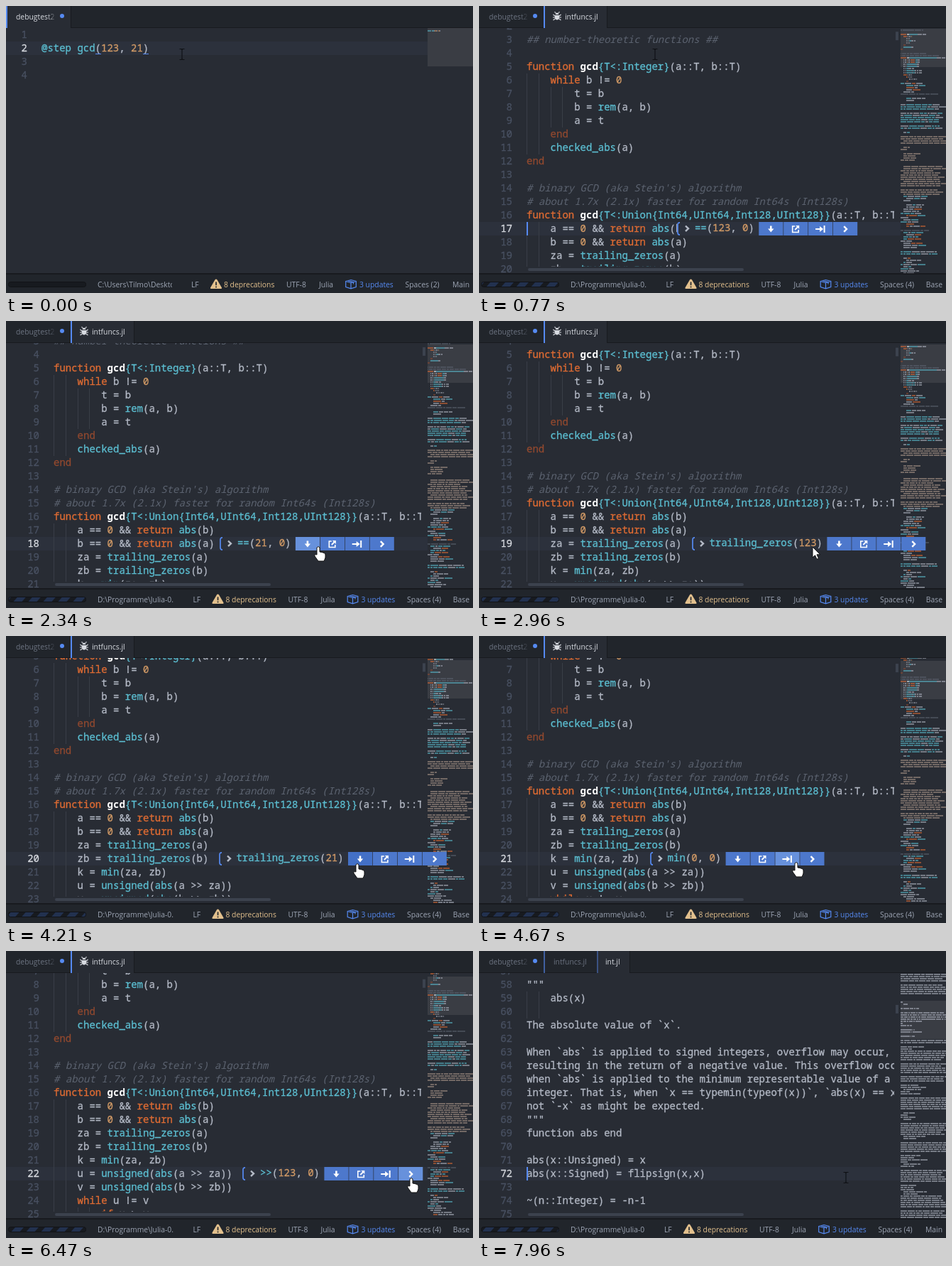
Recreate the animation shown at these times as an HTML page with a canvas. Size 658x404 px, loop 8 s.

```html
<!DOCTYPE html>
<html lang="en">
<head>
<meta charset="utf-8">
<title>Stepping through gcd</title>
<style>
  html, body { margin: 0; width: 658px; height: 404px; overflow: hidden; background: #282c34; }
  canvas { display: block; }
</style>
</head>
<body>
<canvas id="stage" width="658" height="404"></canvas>
<script>
const ctx = document.getElementById('stage').getContext('2d');
const LOOP = 8000, OPEN = 700, FINISH = 7560, JUMP = 7900;
const CHAR = 8.4, ROW = 19, TOP = 31, BOTTOM = 376, FOCUS = 304;
const MONO = '14px "Noto Sans Mono", monospace';
const UI = '10.35px "Open Sans", sans-serif';
const C = {
  bg: '#282c34', row: '#2c313c', bar: '#21252b', edge: '#181a1f', fg: '#b4bac6', bright: '#d7dae0',
  dim: '#6b7280', gutter: '#495162', blue: '#568af2', cyan: '#5cbfd2', orange: '#e06c33',
  end: '#91492f', number: '#d19a66', comment: '#5c6370', button: '#4d78cc', hover: '#6791dc',
  press: '#4370c6', warn: '#e2c08d', doc: '#b09a8c', status: '#9da5b4'
};

const scratch = ['', '@step gcd(123, 21)', '', ''];
const gcdCode = `# This file is a part of Julia. License is MIT

## number-theoretic functions ##

function gcd{T<:Integer}(a::T, b::T)
    while b != 0
        t = b
        b = rem(a, b)
        a = t
    end
    checked_abs(a)
end

# binary GCD (aka Stein's) algorithm
# about 1.7x (2.1x) faster for random Int64s (Int128s)
function gcd{T<:Union{Int64,UInt64,Int128,UInt128}}(a::T, b::T)
    a == 0 && return abs(b)
    b == 0 && return abs(a)
    za = trailing_zeros(a)
    zb = trailing_zeros(b)
    k = min(za, zb)
    u = unsigned(abs(a >> za))
    v = unsigned(abs(b >> zb))
    while u != v
        if u > v
            u, v = v, u
        end`.split('\n');
const absCode = [
  '"""', '    abs(x)', '', 'The absolute value of `x`.', '',
  'When `abs` is applied to signed integers, overflow may occur,',
  'resulting in the return of a negative value. This overflow occurs',
  'when `abs` is applied to the minimum representable value of a signed',
  'integer. That is, when `x == typemin(typeof(x))`, `abs(x) == x < 0`,',
  'not `-x` as might be expected.', '"""', 'function abs end', '',
  'abs(x::Unsigned) = x', 'abs(x::Signed) = flipsign(x,x)', '', '~(n::Integer) = -n-1', ''
];
const ABS_START = 58;

// [time, line, call shown beside the line]
const steps = [
  [OPEN, 17, '==(123, 0)'], [2050, 18, '==(21, 0)'], [2600, 19, 'trailing_zeros(123)'],
  [3560, 20, 'trailing_zeros(21)'], [4300, 21, 'min(0, 0)'], [5050, 22, '>>(123, 0)']
];
// [time, x, y]
const mousePath = [
  [0, 248, 68], [880, 248, 68], [1150, 290, 108], [1450, 459, 320], [1750, 440, 318],
  [2720, 440, 318], [2960, 470, 318], [3250, 502, 320], [3600, 495, 321], [4330, 495, 321],
  [4600, 462, 319], [4880, 366, 318], [5080, 366, 318], [5230, 407, 357], [5600, 412, 356],
  [6300, 571, 320], [7570, 571, 320], [7790, 517, 319], [LOOP, 517, 319]
];

const SYNTAX = /(?<comment>#.*)|(?<name>(?<=function )\w+)|(?<orange>\b(?:function|while|return|if)\b)|(?<end>\bend\b)|(?<cyan>\{.*\}|@\w+|[a-z]\w*(?=\()|^(?:==|>>))|(?<number>\b\d+\b)/g;

function tokenize(line, plain) {
  if (plain) return [{ at: 0, text: line, kind: 'fg' }];
  const out = [];
  let at = 0;
  const add = (text, kind) => { if (text) out.push({ at, text, kind }); at += text.length; };
  for (const m of line.matchAll(SYNTAX)) {
    add(line.slice(at, m.index), 'fg');
    add(m[0], Object.keys(m.groups).find(k => m.groups[k] !== undefined));
  }
  add(line.slice(at), 'fg');
  return out;
}

function text(str, x, y, color, font = UI, align = 'left') {
  ctx.font = font;
  ctx.textAlign = align;
  ctx.fillStyle = color;
  ctx.fillText(str, x, y);
}
// Code is set slightly heavier than the regular weight.
function codeText(str, x, y, color, style = '', align) {
  text(str, x, y, color, style + MONO, align);
  if (style) return;
  ctx.strokeStyle = color;
  ctx.lineWidth = 0.3;
  ctx.strokeText(str, x, y);
}
function rect(x, y, w, h, color) {
  ctx.fillStyle = color;
  ctx.fillRect(x, y, w, h);
}
function stroke(path, color, width = 1) {
  ctx.strokeStyle = color;
  ctx.lineWidth = width;
  ctx.stroke(new Path2D(path));
}
function fill(path, color) {
  ctx.fillStyle = color;
  ctx.fill(new Path2D(path));
}
function at(x, y, draw) {
  ctx.save();
  ctx.translate(x, y);
  draw();
  ctx.restore();
}
function clipped(x, y, w, h, draw) {
  ctx.save();
  ctx.beginPath();
  ctx.rect(x, y, w, h);
  ctx.clip();
  draw();
  ctx.restore();
}

function codeLine(line, x, y, plain) {
  for (const { at, text: str, kind } of tokenize(line, plain)) {
    const style = kind === 'name' ? 'bold ' : kind === 'comment' ? 'italic ' : '';
    codeText(str, x + at * CHAR, y, kind === 'name' ? '#ffffff' : C[kind], style);
  }
}

// Minimap rows are lists of [x, width, color].
let seed = 7;
const rand = () => (seed = (seed * 16807) % 2147483647) / 2147483647;
const pick = list => list[Math.floor(rand() * list.length)];
// kind: [indents, least width, spread, colors]
const kinds = {
  gap: [[0], 0, 0, [C.fg]],
  code: [[0, 4, 4, 8, 8], 6, 20, [C.cyan, C.fg, C.fg, C.orange]],
  wide: [[0], 46, 10, [C.cyan, C.cyan, C.fg]],
  note: [[0], 35, 25, [C.comment]],
  doc: [[0, 0, 4], 46, 18, [C.doc]],
  stub: [[0, 4], 6, 14, [C.doc]],
  plain: [[0], 56, 10, [C.fg]],
  brief: [[0, 0, 4], 8, 24, [C.fg]]
};
function fakeRows(spec) {
  return spec.trim().split(/\s+/).flatMap(item => {
    const [kind, count] = item.split(':');
    const [indents, least, spread, colors] = kinds[kind];
    return Array.from({ length: +count }, () => {
      const runs = [];
      let x = pick(indents);
      const stop = x + least + rand() * spread;
      while (x < stop) {
        const w = 3 + Math.floor(rand() * 9);
        runs.push([x, w, pick(colors)]);
        x += w + 1;
      }
      return runs;
    });
  });
}
function realRows(lines, plain) {
  return lines.map(line => tokenize(line, plain).flatMap(tok =>
    [...tok.text.matchAll(/\S+/g)].map(m =>
      [tok.at + m.index, m[0].length, C[tok.kind] || '#ffffff'])));
}
const scratchMap = realRows(scratch);
const gcdMap = realRows(gcdCode).concat(fakeRows(`code:5 note:1 gap:1 code:2 gap:1 wide:3 gap:1
  wide:5 gap:1 wide:2 gap:1 code:1 gap:1 doc:4 gap:1 stub:2 gap:1 stub:4 gap:2 doc:10 gap:1 doc:3
  code:3 gap:1 code:11 gap:1 note:1 code:8 gap:1 wide:2 gap:1 code:10 gap:1 note:1 code:12`));
const absMap = fakeRows('gap:43 plain:5 gap:1 plain:5 gap:3').concat(realRows(absCode, true),
  fakeRows(`plain:2 gap:1 brief:2 plain:5 gap:1 plain:5 gap:1 plain:3 gap:1 brief:5 gap:1 plain:6
  gap:1 brief:4 gap:1 plain:6 brief:2 gap:1 plain:5 gap:1 brief:6 gap:1 plain:6 gap:1 brief:5
  plain:6 gap:1 plain:8`));

function minimap(rows, scroll) {
  const shift = scroll * 0.122;
  clipped(594, TOP, 64, BOTTOM - TOP, () => {
    rect(594, Math.round(TOP + scroll * 3 / ROW - shift), 64, 54, '#3a3d44');
    ctx.globalAlpha = 0.55;
    rows.forEach((runs, i) => {
      const y = Math.round(TOP + i * 3 - shift);
      for (const [x, w, color] of runs) rect(594 + x, y, w, 2, color);
    });
    ctx.globalAlpha = 1;
  });
}

function editor({ lines, start = 1, current, focusY, x, plain }) {
  const rowTop = n => focusY + (n - current) * ROW;
  const short = lines === scratch;
  rect(0, focusY, 594, ROW, C.row);
  clipped(0, TOP, 594, BOTTOM - TOP, () => {
    const last = short ? lines.length : current + 4;
    for (let n = Math.max(1, current - 16); n <= last; n++) {
      codeText(n, x - 20, rowTop(n) + 14, n === current ? C.bright : C.gutter, '', 'right');
    }
  });
  clipped(0, TOP, short ? 594 : 585, short ? 345 : 336, () => {
    let indent = 0;
    lines.forEach((line, i) => {
      const y = rowTop(start + i);
      if (line) indent = line.search(/\S/);
      for (let g = 0; g < indent; g += 2) rect(Math.round(x + g * CHAR), y, 1, ROW, '#393e47');
      codeLine(line, x, y + 14, plain);
    });
  });
  if (short) return;
  const scroll = TOP + (current - 1) * ROW - FOCUS;
  rect(587, TOP + 4 + scroll * 0.038, 4, 12, '#3c424e');
  ctx.beginPath();
  ctx.roundRect(69, 369, 304, 4, 2);
  ctx.fillStyle = '#3c424e';
  ctx.fill();
}

const icons = [
  () => fill('M-1.3-4.5H1.3V-.5H4.2L0 4.5-4.2-.5H-1.3Z', '#fff'),
  () => { stroke('M-1-4H-4.5V4.5H4V1', '#fff', 1.6); stroke('M-1 1L3-3', '#fff', 1.8); fill('M0-5H5V0Z', '#fff'); },
  () => { stroke('M-7 0H0M5.5-5V5', '#fff', 2); fill('M-1-4L4 0-1 4Z', '#fff'); },
  () => stroke('M-1.8-3.8L2 0-1.8 3.8', '#fff', 2.4)
];

function widgetLayout(t, [time, line, call]) {
  const slide = -36 * Math.max(0, 1 - (t - time) / 360);
  const left = 67 + gcdCode[line - 1].length * CHAR + 14.4 + slide;
  return { left, buttons: left + 31 + call.length * CHAR };
}

function widget(call, { left, buttons }, mouse, pressed) {
  rect(left, FOCUS, buttons - left, ROW, C.row);
  at(Math.round(left), FOCUS, () => {
    stroke('M4 .8Q1 .8 1 4V15Q1 18.2 4 18.2', C.blue, 1.7);
    stroke('M12 5.5L16 9.3 12 13', C.fg, 2.4);
  });
  codeLine(call, left + 24.6, FOCUS + 13);
  icons.forEach((icon, i) => {
    const x = buttons + i * 34.9;
    const over = mouse.y >= FOCUS && mouse.y < FOCUS + ROW && mouse.x >= x && mouse.x < x + 34.9;
    rect(x, FOCUS, 34.2, ROW, over ? (pressed ? C.press : C.hover) : C.button);
    at(x + 17, FOCUS + 10, icon);
  });
}

// glow is the strength of the blue marker on the left edge
function tab(x, w, label, labelX, active, glow = active ? 1 : 0) {
  rect(x, 0, w, TOP, active ? C.bg : C.bar);
  rect(x + w - 1, 0, 1, TOP, C.edge);
  if (!active) rect(x, TOP - 1, w, 1, C.edge);
  ctx.globalAlpha = glow;
  rect(x, 0, 2, TOP, C.blue);
  ctx.globalAlpha = 1;
  let color = active ? C.bright : C.dim;
  if (label === 'debugtest2') {
    const fade = ctx.createLinearGradient(58, 0, 71, 0);
    fade.addColorStop(0, color);
    fade.addColorStop(1, active ? C.bg : C.bar);
    color = fade;
  }
  text(label, labelX, 19, color);
}

function bug() {
  fill('M-3.2-1H3.2V2Q3 5.5 0 5.5T-3.2 2ZM-2.4-2Q-2.2-4.4 0-4.4T2.4-2Z', C.bright);
  stroke('M-2-4L-3.4-6M2-4L3.4-6M-3-0L-5.6-2M3 0L5.6-2M-3 2H-6M3 2H6M-3 4L-5.4 6M3 4L5.4 6', C.bright, 1.2);
}

function tabs(t, opened, jumped) {
  rect(0, 0, 658, TOP, C.bar);
  rect(0, TOP - 1, 658, 1, C.edge);
  tab(0, 92, 'debugtest2', 14, !opened);
  ctx.beginPath();
  ctx.arc(79, 14, 3, 0, 7);
  ctx.fillStyle = C.blue;
  ctx.fill();
  if (jumped) {
    const glow = Math.min(1, (t - JUMP) / 150);
    tab(91, 76, 'intfuncs.jl', 105, false, 1 - glow);
    tab(166, 47, 'int.jl', 178, true, glow);
  } else if (opened) {
    tab(91, 90, 'intfuncs.jl', 121, true);
    at(110, 14, bug);
  }
}

function progress(t) {
  ctx.beginPath();
  ctx.roundRect(3.5, 388.5, 109, 7, 3);
  ctx.fillStyle = '#171a1f';
  ctx.fill();
  ctx.save();
  ctx.clip();
  if (t >= 310) {
    const pitch = 21, shift = (t * 0.04) % pitch;
    for (let x = shift - pitch; x < 120; x += pitch) fill(`M${x + 7} 388h12l-7 8h-12Z`, '#22314f');
  }
  ctx.restore();
  ctx.strokeStyle = '#111317';
  ctx.lineWidth = 1;
  ctx.stroke();
}

function statusBar(t, opened, inBase) {
  rect(0, BOTTOM, 658, 28, C.bar);
  rect(0, BOTTOM, 658, 2, C.edge);
  progress(t);
  const shift = inBase ? 2.5 : 0, y = 396;
  clipped(120, 380, 114 + shift, 24, () =>
    text(opened ? 'D:\\Programme\\Julia-0.' : 'C:\\Users\\Tilmo\\Deskto', 129, y, C.status));
  at(shift, 0, () => {
    text('LF', 261, y, C.status);
    fill('M296 384.5Q297 384.5 297.6 385.6L304 396.5Q304.4 398 303 398H289Q287.6 398 288 396.5L294.4 385.6Q295 384.5 296 384.5Z', C.warn);
    rect(295.2, 388.5, 1.7, 4.7, C.bar);
    rect(295.2, 394.6, 1.7, 1.8, C.bar);
    text('8 deprecations', 307, y, C.warn);
    text('UTF-8', 395, y, C.status);
    text('Julia', 441, y, C.status);
    stroke('M478.7 387.5L486 385.5 493.3 387.5V395.5L486 397.8 478.7 395.5ZM478.7 387.5L486 389.7 493.3 387.5M486 389.7V397.8M482 386.6L489.5 388.8V391.5', C.blue, 1.2);
    text('3 updates', 498, y, C.blue);
    text(opened ? 'Spaces (4)' : 'Spaces (2)', 562.5, y, C.status);
  });
  text(inBase ? 'Base' : 'Main', 653, y, C.status, UI, 'right');
}

function mouseAt(t) {
  const i = mousePath.findIndex(p => p[0] > t);
  const [t0, x0, y0] = mousePath[i - 1], [t1, x1, y1] = mousePath[i];
  const p = (t - t0) / (t1 - t0), e = p * p * (3 - 2 * p);
  return { x: x0 + (x1 - x0) * e, y: y0 + (y1 - y0) * e };
}

function pointer({ x, y }, box) {
  const inRow = box && y >= FOCUS && y < FOCUS + ROW;
  at(Math.round(x), Math.round(y), () => {
    ctx.lineJoin = 'round';
    const outline = path => { fill(path, '#fff'); stroke(path, '#111', 1); };
    if (inRow && x >= box.buttons && x < box.buttons + 139) {
      outline('M-2 1Q0-2 2 1V7L5 7.5 8 8.5Q10 9 10 11V15Q9 18 8 20H0L-5 13Q-6 10-2 11Z');
    } else if (inRow && x >= box.left) {
      outline('M0 0V15L3.5 11.8 6 17.3 8.5 16.2 6 10.8H10.7Z');
    } else {
      stroke('M-3.5-7.5H-1L0-6.5 1-7.5H3.5M0-6.5V6.5M-3.5 7.5H-1L0 6.5 1 7.5H3.5', '#0e1014', 1.1);
    }
    ctx.lineJoin = 'miter';
  });
}

function draw(t) {
  const opened = t >= OPEN, jumped = t >= JUMP, inBase = opened && t < FINISH;
  const mouse = mouseAt(t);
  let box = null;
  rect(0, 0, 658, 404, C.bg);
  tabs(t, opened, jumped);
  if (!opened) {
    editor({ lines: scratch, current: 2, focusY: 50, x: 50 });
    rect(126, 67, 8, 1, C.blue);
    rect(193, 67, 8, 1, C.blue);
    minimap(scratchMap, 0);
  } else if (jumped) {
    editor({ lines: absCode, start: ABS_START, current: 72, focusY: FOCUS, x: 67, plain: true });
    rect(67, FOCUS, 2, ROW, C.blue);
    minimap(absMap, 1076);
  } else {
    const step = steps.filter(s => s[0] <= t).pop();
    const current = step[1];
    editor({ lines: gcdCode, current, focusY: FOCUS, x: 67 });
    minimap(gcdMap, TOP + (current - 1) * ROW - FOCUS);
    if (current === 17 && Math.floor(t / 400) % 2) rect(67, FOCUS, 2, ROW, C.blue);
    if (inBase) {
      box = widgetLayout(t, step);
      widget(step[2], box, mouse, steps.some(s => s[0] > t && s[0] - t < 150));
    }
  }
  statusBar(t, opened, inBase);
  pointer(mouse, box);
}

const began = performance.now();
function tick() {
  draw((performance.now() - began) % LOOP);
  requestAnimationFrame(tick);
}
tick();
</script>
</body>
</html>
```
